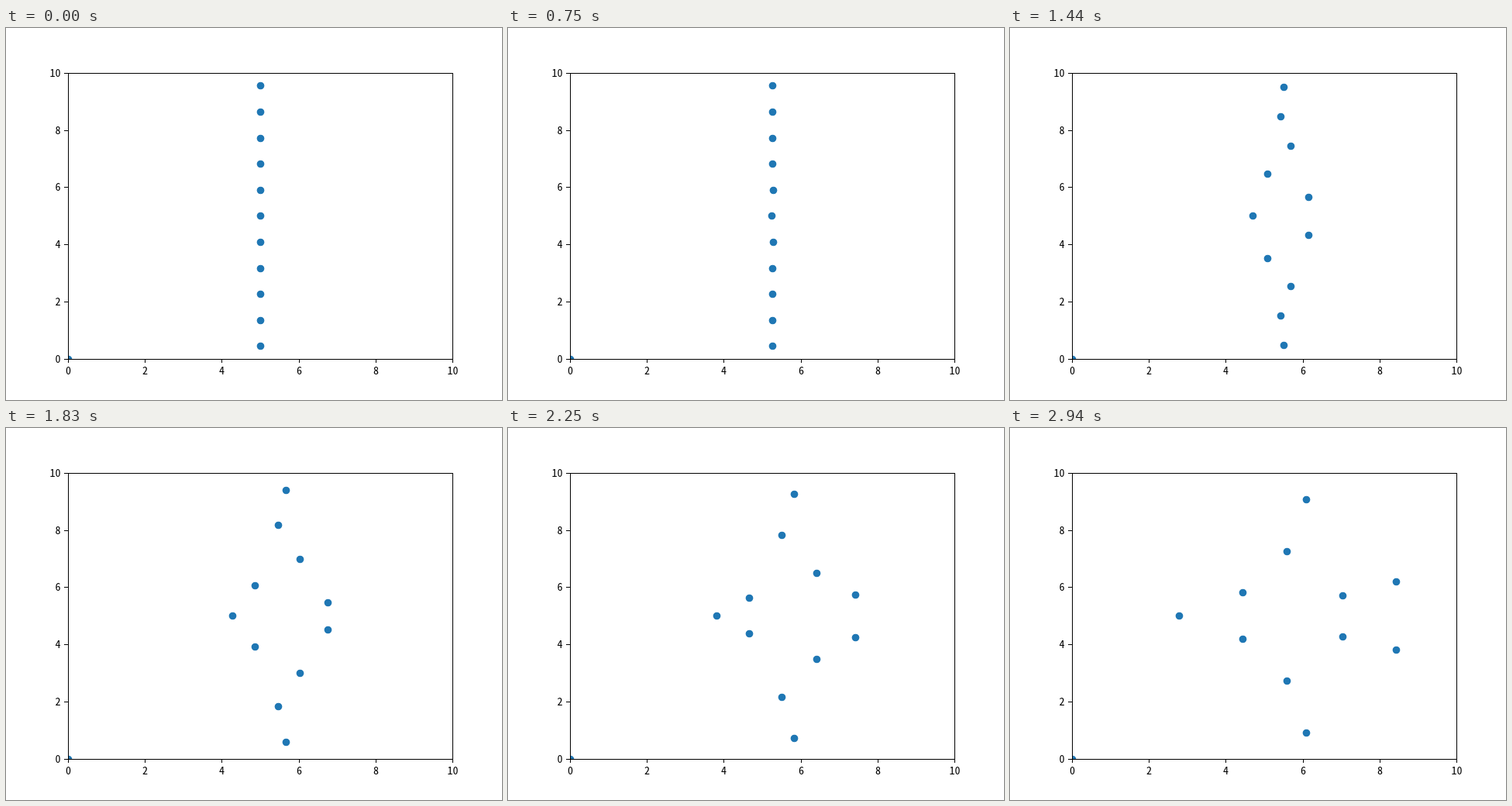
These frames come from a looping animation (640 by 480 pixels, 2970 ms). An HTML page with a canvas:

```html
<!DOCTYPE html>
<html lang="en">
<head>
<meta charset="utf-8">
<title>Repelling particles</title>
<style>
  html, body { margin: 0; width: 100%; height: 100%; overflow: hidden; background: #fff; }
  canvas { display: block; }
</style>
</head>
<body>
<canvas id="stage" width="640" height="480"></canvas>
<script>
const ctx = document.getElementById('stage').getContext('2d');
const LEFT = 80, RIGHT = 576, TOP = 57.6, BOTTOM = 427.2;
const MIDDLE = (TOP + BOTTOM) / 2, SPACING = (BOTTOM - TOP) / 11;
const STEP = 30, STEPS = 99;
const START_X = 328, DRIFT = 0.53;

// Velocity changes from the centre outwards: [time, change, half duration], in steps
const particles = [
  { x: [[29, -2.12, 9], [72.2, -0.61, 3]], y: [] },
  { x: [[30.94, 1.835, 9], [70, -0.18, 3]], y: [[33.85, 0.65, 9], [60.25, -1.38, 3]] },
  { x: [[32.2, -1.36, 9], [72, 0.37, 3]], y: [[37.2, 1.18, 9], [72, -0.12, 3], [82, -1.97, 3]] },
  { x: [[37.3, 0.8, 9]], y: [[39.9, 1.28, 9]] },
  { x: [[34.9, -0.37, 9]], y: [[41.6, 0.9, 9]] },
  { x: [[50, 0.04, 9]], y: [[44, 0.33, 9]] }
];

// Distance gained by t from a velocity change spread over time ± half
function gain(t, [time, change, half]) {
  const s = t - time;
  if (s <= -half) return 0;
  return change * (s >= half ? s : (s + half) ** 2 / (4 * half));
}

const travel = (t, kicks) => kicks.reduce((sum, kick) => sum + gain(t, kick), 0);

function dot(x, y) {
  ctx.beginPath();
  ctx.arc(Math.round(x) + 0.5, Math.round(y) + 0.5, 4.86, 0, 2 * Math.PI);
  ctx.fill();
}

function drawParticles(t) {
  ctx.save();
  ctx.beginPath();
  ctx.rect(LEFT, 58, RIGHT - LEFT + 1, 370);
  ctx.clip();
  ctx.fillStyle = '#1f77b4';
  dot(LEFT, BOTTOM);
  particles.forEach((p, i) => {
    const x = START_X + DRIFT * t + travel(t, p.x);
    const offset = i * SPACING - travel(t, p.y);
    dot(x, MIDDLE - offset);
    if (i) dot(x, MIDDLE + offset);
  });
  ctx.restore();
}

function drawAxes() {
  ctx.strokeStyle = ctx.fillStyle = '#000';
  ctx.lineWidth = 1;
  ctx.strokeRect(LEFT + 0.5, 58.5, RIGHT - LEFT, 369);
  ctx.font = '14px "Noto Sans Mono CJK JP", "Noto Sans CJK JP", monospace';
  for (let value = 0; value <= 10; value += 2) {
    const x = Math.round(LEFT + (RIGHT - LEFT) * value / 10);
    const y = Math.round(BOTTOM - (BOTTOM - TOP) * value / 10);
    ctx.fillRect(x, 428, 1, 4);
    ctx.fillRect(LEFT - 5, y, 5, 1);
    ctx.textAlign = 'center';
    ctx.fillText(value, x + 0.5, 447);
    ctx.textAlign = 'right';
    ctx.fillText(value, 70.5, y + 5);
  }
}

function draw() {
  const t = Math.floor(performance.now() / STEP) % STEPS;
  ctx.fillStyle = '#fff';
  ctx.fillRect(0, 0, 640, 480);
  drawParticles(t);
  drawAxes();
  requestAnimationFrame(draw);
}
draw();
</script>
</body>
</html>
```
